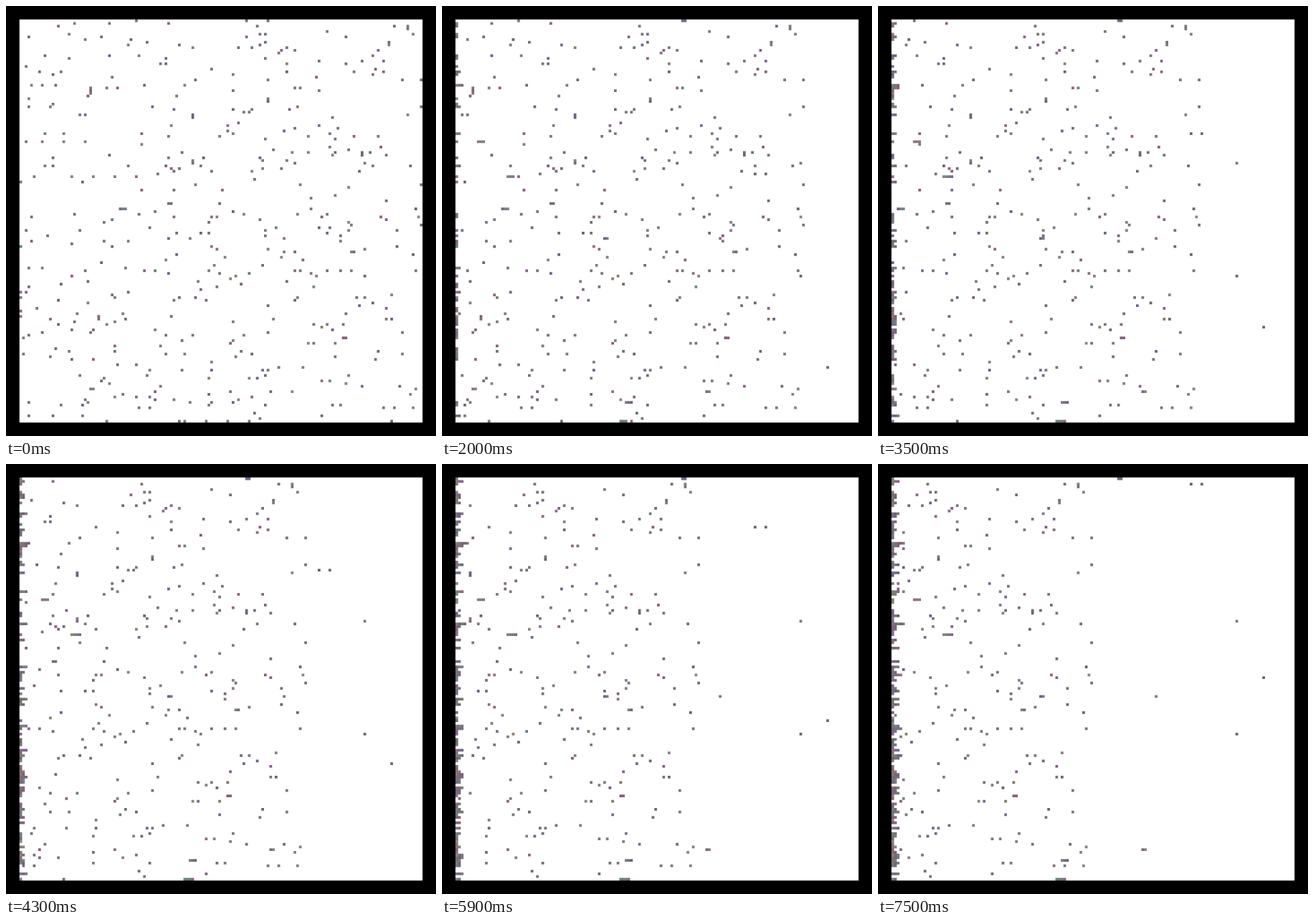
Recreate the animation shown at these times as a matplotlib script. Size 600x600 px, loop 7.6 s.

```python
import numpy as np
import matplotlib.pyplot as plt
from matplotlib.animation import FuncAnimation

STAGE, SIZE, PAD, STEPS = 600, 150, 5, 76
FULL = SIZE + 2 * PAD
DRIFTERS = 440
rng = np.random.default_rng(4)

# Still cells: column, row, number of drifters that queue behind them.
ANCHORS = [(128, 53, 0), (128, 95, 0), (98, 81, 3), (55, 81, 1), (93, 138, 1),
           (19, 58, 3), (8, 45, 2), (63, 142, 2), (61, 149, 3), (84, 0, 1)]

# Cells that rise one row per step: column, start row.
CLIMBERS = [(111, 77), (115, 77), (138, 149)]


def place_cells():
    """Scatter drifters evenly, then lay out the anchors and their queues."""
    filled = np.zeros((SIZE, SIZE), bool)
    filled.flat[rng.choice(SIZE * SIZE, DRIFTERS, replace=False)] = True
    fixed = np.zeros_like(filled)
    for col, row, queue in ANCHORS:
        filled[row, col:] = False
        filled[row, col:col + 8 * queue + 1:8] = True
        fixed[row, col] = True
    for col, row, queue in ANCHORS:
        filled[row, col] = True
    return filled, fixed


def resting_columns(rows, cols, fixed):
    """Each cell stops at the wall, or right behind the cell ahead of it."""
    rest = np.zeros_like(cols)
    free = np.zeros(SIZE, int)
    for i, (r, c) in enumerate(zip(rows, cols)):
        rest[i] = c if fixed[r, c] else free[r]
        free[r] = rest[i] + 1
    return rest


def coverage():
    """Share of every pixel that each cell covers along one axis."""
    cell = STAGE / FULL
    left = np.arange(STAGE)[:, None]
    edge = np.arange(FULL) * cell
    overlap = np.minimum(left + 1, edge + cell) - np.maximum(left, edge)
    return np.clip(overlap, 0, 1)


def tints(count):
    return rng.uniform((.40, .36, .42), (.57, .52, .57), (count, 3))


filled, fixed = place_cells()
rows, cols = np.nonzero(filled)
rest = resting_columns(rows, cols, fixed)
colors = tints(len(rows))
climb_colors = tints(len(CLIMBERS))
cover = coverage()


def picture(step):
    grid = np.zeros((FULL, FULL, 3))
    room = grid[PAD:-PAD, PAD:-PAD]
    room[:] = 1
    room[rows, np.maximum(cols - step, rest)] = colors
    for (col, row), color in zip(CLIMBERS, climb_colors):
        room[row - step, col] = color
    layers = [cover @ grid[..., k] @ cover.T for k in range(3)]
    return np.clip(np.stack(layers, axis=-1), 0, 1)


fig = plt.figure(figsize=(6, 6), dpi=100, facecolor="black")
ax = fig.add_axes((0, 0, 1, 1))
ax.axis("off")
view = ax.imshow(picture(0), interpolation="nearest", aspect="auto")


def update(step):
    view.set_data(picture(step))
    return [view]


anim = FuncAnimation(fig, update, frames=STEPS, interval=100, repeat=True,
                     repeat_delay=0, blit=False)
plt.show()
```
